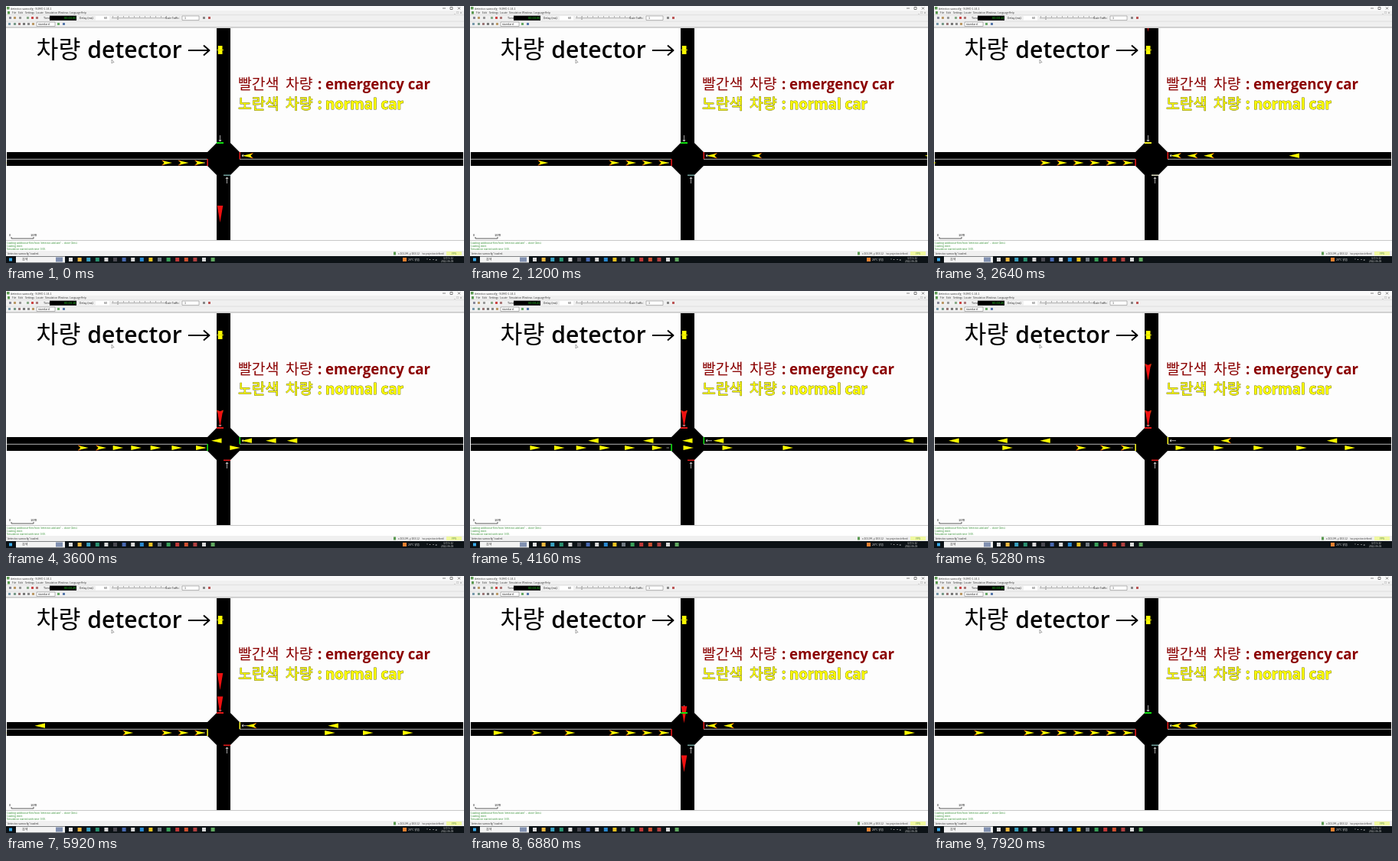
Recreate the animation shown at these times as an HTML page with a canvas. Size 598 by 336 pixels, loop 8 s.

```html
<!DOCTYPE html>
<html lang="ko">
<head>
<meta charset="utf-8">
<title>Traffic simulation</title>
<style>
html, body { margin: 0; width: 100%; height: 100%; overflow: hidden; background: #fff; }
canvas { display: block; width: 598px; height: 336px; }
</style>
</head>
<body>
<canvas id="stage" width="598" height="336"></canvas>
<script>
const ctx = document.getElementById('stage').getContext('2d');
const STEP = 80, STEPS = 100;
const LATIN = '"Open Sans", sans-serif';
const HANGUL = '"Noto Sans CJK KR", "Noto Sans CJK", sans-serif';

// Signal changes in simulation time, which slows down when traffic gets dense
const SIDE_YELLOW = 31, MAIN_GREEN = 38, MAIN_YELLOW = 62.5, SIDE_GREEN = 69.8;
const simulationTime = step => step < 58 ? step : 58 + .7 * (step - 58);

const CRUISE = 16.5, BRAKE = 2.26, BRAKE_TIME = CRUISE / BRAKE, TOP_SPEED = 18;

// Each car: queue slot, time it has stopped, start lag, then slot and time of a second stop
const eastFirst = [[1, -9], [2, -9], [3, -9], [4, 15.4], [5, 23], [6, 30],
  [7, 44.4, 0, 1, 65], [8, 46.3, 0, 2, 66.2], [9, 54, 0, 3, 67.6], [10, 63, 5.5, 4, 74.3]];
const eastSecond = [[5, 83.3], [6, 84.8], [7, 86.5], [8, 92.9]];
const westFirst = [[1, -9, .4], [2, 20.7], [3, 33.3], [4, 42.1]];
const westSecond = [[1, 71.2], [2, 78.3]];
const southCars = [[1, 45.4, -1.5], [2, 68.9, -1.5]];

function rect(x, y, w, h, color) {
  ctx.fillStyle = color;
  ctx.fillRect(x, y, w, h);
}

function line(color, width, ...points) {
  ctx.strokeStyle = color;
  ctx.lineWidth = width;
  ctx.beginPath();
  points.forEach(([x, y]) => ctx.lineTo(x, y));
  ctx.stroke();
}

function shape(color, ...points) {
  ctx.fillStyle = color;
  ctx.beginPath();
  points.forEach(([x, y]) => ctx.lineTo(x, y));
  ctx.fill();
}

function text(value, x, y, size, color = '#222', weight = 400, family = LATIN, outline) {
  ctx.font = `${weight} ${size}px ${family}`;
  if (outline) {
    ctx.strokeStyle = outline;
    ctx.lineWidth = .9;
    ctx.lineJoin = 'round';
    ctx.strokeText(value, x, y);
  }
  ctx.fillStyle = color;
  ctx.fillText(value, x, y);
}

const tiny = (value, x, y, color, size = 3.6) => text(value, x, y, size, color, 400, HANGUL);

// Distance still to go before the stop: cruising, then constant braking
function gap(left) {
  if (left <= 0) return 0;
  return left < BRAKE_TIME ? BRAKE * left * left / 2 : CRUISE * (left - BRAKE_TIME / 2);
}

// Distance covered after the light turns green; the queue starts one by one
function launch(time, green, slot, lag) {
  const since = Math.max(0, time - green + 1.7 - 1.25 * slot - lag);
  const power = .75 + .9 / slot, ramp = TOP_SPEED / power;
  return since < ramp ? power * since * since / 2 : TOP_SPEED * (since - ramp / 2);
}

// Draws a car pointing along +x with its tip at the origin
function car({ length, half, notch, color }, braking) {
  shape(color, [0, 0], [-length, -half], [(braking ? notch : 0) - length, 0], [-length, half]);
  if (braking) {
    for (const side of [-1, 1])
      line('#e04a10', .9, [-length, side * half], [-length + 3.5, side * (half - .7)]);
  }
}

const normalCar = { length: 13.5, half: 3.1, notch: 3.2, color: '#ff0' };
const emergencyCar = { length: 22, half: 3.8, notch: 1.5, color: '#f01010' };

function queue(cars, time, green, place, look = normalCar, first = 260, spacing = 21.5) {
  const slotAt = slot => first - spacing * (slot - 1);
  for (const [slot, stop, lag = 0, nextSlot, nextStop] of cars) {
    const moved = launch(time, green, slot, lag);
    const stopsAgain = nextSlot && nextStop - time < BRAKE_TIME;
    const at = stopsAgain ? slotAt(nextSlot) - gap(nextStop - time) : slotAt(slot) - gap(stop - time) + moved;
    if (at > 585) continue;
    ctx.save();
    place(at);
    car(look, stopsAgain || moved === 0 && stop - time < 8.2);
    ctx.restore();
  }
}

const eastbound = at => ctx.translate(at, 205);
const westbound = at => { ctx.translate(569 - at, 195.7); ctx.scale(-1, 1); };
const southbound = at => { ctx.translate(279.5, at); ctx.rotate(Math.PI / 2); };

function laneArrow(x, y, dx, dy) {
  const tip = [x + dx * 8, y + dy * 8];
  line('#ccc', .8, [x, y], tip);
  line('#fff', .8, [tip[0] - dx * 2 + dy * 1.5, tip[1] - dy * 2 + dx * 1.5], tip,
    [tip[0] - dx * 2 - dy * 1.5, tip[1] - dy * 2 - dx * 1.5]);
}

function roads() {
  rect(275, 29, 18, 277, '#000');
  rect(1, 191, 596, 18, '#000');
  shape('#000', [275, 179], [293, 179], [305, 191], [305, 209], [293, 221], [275, 221], [263, 209], [263, 191]);
  rect(1, 199.8, 262, .9, '#ccc');
  rect(305, 199.8, 292, .9, '#ccc');
  rect(277, 52, 5.5, 11, '#ff0');
  rect(275.5, 57, 8.5, 1, '#dd0');
  laneArrow(279.5, 169, 0, 1);
  laneArrow(288.5, 232, 0, -1);
  line('#aaa', .8, [256.5, 205], [260, 205]);
  laneArrow(316, 195.7, -1, 0);
}

function signals(time) {
  const red = '#e01818', yellow = '#f2f020', green = '#10e010';
  const mainOpen = time >= MAIN_GREEN && time < SIDE_GREEN;
  const main = !mainOpen ? red : time < MAIN_YELLOW ? green : yellow;
  const sideYellow = time >= SIDE_YELLOW && time < MAIN_GREEN;
  rect(275, 178, 9, 2, mainOpen ? red : sideYellow ? yellow : green);
  rect(284, 220.5, 9, 1.5, mainOpen ? red : sideYellow ? '#dcdcc0' : '#70a09c');
  rect(262.3, 200, 1.6, 9, main);
  rect(304.5, 191, 1.6, 9, main);
}

function captions() {
  text('차량', 39.5, 68.3, 31.4, '#000', 400, HANGUL);
  text('detector', 106.3, 68, 30.1, '#000', 600);
  line('#000', 2, [238, 58], [265, 58]);
  line('#000', 2, [258, 51.5], [265.5, 58], [258, 64.5]);
  const rows = [
    ['빨간색', 'emergency car', 109, '#8b0000'],
    ['노란색', 'normal car', 135, '#ff0', '#6c6c10']
  ];
  for (const [hue, name, y, color, outline] of rows) {
    text(hue, 303, y, 19.4, color, 400, HANGUL, outline);
    text('차량', 365, y, 19.4, color, 400, HANGUL, outline);
    text(':', 407, y, 18.7, color, 700, LATIN, outline);
    text(name, 417, y, 18.7, color, 700, LATIN, outline);
  }
}

function icons(list, y, size) {
  for (const [x, color] of list) rect(x, y, size, size, color);
}

function toolbars(time) {
  rect(0, 0, 598, 28, '#f0f0f0');
  rect(0, 0, 598, 6, '#fafafa');
  rect(1, 1, 3.5, 3.5, '#5a9a50');
  tiny('detector.sumocfg - SUMO 1.14.1', 6, 4.6, '#333');
  line('#333', .6, [570, 3], [574, 3]);
  ctx.strokeRect(580, 1.5, 3, 3);
  line('#333', .6, [590, 1.5], [593, 4.5]);
  line('#333', .6, [593, 1.5], [590, 4.5]);
  rect(2, 7, 3, 3.5, '#5a9a50');
  ['File', 'Edit', 'Settings', 'Locate', 'Simulation', 'Windows', 'Language', 'Help']
    .forEach((name, i) => tiny(name, [8, 16, 25, 39, 51, 68, 83, 98][i], 10.3, '#333', 3.2));
  tiny('_ □ ×', 585, 10, '#555');
  rect(0, 11.6, 598, .5, '#ccc');
  rect(0, 19.8, 598, .5, '#ccc');
  rect(0, 27.6, 598, .8, '#999');

  icons([[4, '#889'], [10, '#b96'], [17, '#999'], [27, '#8a8'], [33, '#c44'], [39, '#a77'],
    [257, '#888'], [264, '#b55']], 14, 3);
  tiny('Time:', 49, 17.2);
  rect(57, 12.7, 35, 6.2, '#000');
  const seconds = Math.floor(180 + time * .42);
  tiny('00:0' + Math.floor(seconds / 60) + ':' + String(seconds % 60).padStart(2, '0'), 76, 17.4, '#20d820', 4);
  tiny('Delay (ms):', 96, 17.2);
  rect(117, 13, 18, 5.5, '#fff');
  tiny('60', 128, 17.2);
  rect(138, 15.4, 71, .8, '#999');
  for (let x = 139; x < 210; x += 7) rect(x, 13, .6, 2, '#888');
  rect(145, 13.5, 2, 4.5, '#bbb');
  tiny('Scale Traffic:', 208, 17.2, '#222', 3.2);
  rect(230, 13, 22, 5.5, '#fff');
  ctx.strokeStyle = '#888';
  ctx.lineWidth = .6;
  ctx.strokeRect(230, 13, 22, 5.5);
  tiny('1', 233, 17.2);

  icons([[3, '#79a'], [10, '#798'], [16, '#977'], [22, '#777'], [28, '#888'], [34, '#b96'],
    [67, '#6a6'], [74, '#57a']], 22, 3);
  rect(40, 21, 24, 5.5, '#fff');
  ctx.strokeRect(40, 21, 24, 5.5);
  tiny('standard', 42, 25.2);
}

function footer() {
  line('#333', .8, [7, 302], [7, 304], [36, 304], [36, 302]);
  tiny('0', 4, 300.5, '#111', 4);
  tiny('10m', 32, 300.5, '#111', 4);
  rect(0, 306, 598, 1.2, '#c8c8c8');
  rect(0, 307, 598, 13, '#fff');
  tiny("Loading additional-files from 'detector.add.xml' ... done (1ms).", 1, 311, '#2a8a2a', 3.2);
  tiny('Loading done.', 1, 314.8, '#2a8a2a', 3.2);
  tiny('Simulation started with time: 0.00.', 1, 318.6, '#2a8a2a', 3.2);
  rect(0, 320, 598, 7, '#f0f0f0');
  tiny("'detector.sumocfg' loaded.", 1, 324.8, '#333', 3.4);
  rect(506, 321.5, 3, 4, '#5a9a50');
  tiny('x:101.84, y:103.12', 512, 324.8, '#333', 3.4);
  tiny('(No projection defined)', 543, 324.8, '#333', 2.7);
  rect(575, 321, 20, 5, '#f0f8a0');
  tiny('FPS', 582, 324.8, '#584', 3.4);

  rect(0, 327, 598, 9, '#0c1216');
  rect(4, 329.5, 4, 4, '#39a9e8');
  rect(13, 327.5, 64, 8, '#f3f3f3');
  tiny('검색', 21, 333, '#444', 4);
  rect(65, 328.5, 9, 6, '#8090b0');
  ['#ddd', '#f0b840', '#38a0c0', '#2a9070', '#d8d8d8', '#484850', '#4868b0', '#d8d8d8', '#2888d0', '#e8c020',
    '#707880', '#38a058', '#c03838', '#d05030', '#b04040', '#d8d8d8', '#60a860']
    .forEach((color, i) => rect(82 + i * 11.6, 329, 5, 5, color));
  rect(518, 329, 5, 5, '#e88030');
  tiny('20°C 맑음', 525, 333, '#ddd');
  tiny('^ ▪ ▪ ◂', 549, 333, '#ddd');
  tiny('오후 5:32', 571, 331.2, '#ddd', 3.2);
  tiny('2022-06-05', 568, 335, '#ddd', 3.2);
}

function pointer() {
  const outline = [[138, 70], [138, 75], [139.4, 73.8], [141, 73.6], [138, 70]];
  shape('#fff', ...outline);
  line('#555', .5, ...outline);
}

function draw(step) {
  const time = simulationTime(step);
  rect(0, 0, 598, 336, '#fdfdfd');
  roads();
  ctx.save();
  ctx.beginPath();
  ctx.rect(0, 29, 597, 277);
  ctx.clip();
  queue(eastFirst, time, MAIN_GREEN, eastbound);
  queue(eastSecond, time, Infinity, eastbound);
  queue(westFirst, time, MAIN_GREEN, westbound);
  queue(westSecond, time, Infinity, westbound);
  queue(southCars, time, SIDE_GREEN, southbound, emergencyCar, 178, 29);
  southbound(283 + CRUISE * time);
  car(emergencyCar, false);
  ctx.restore();
  signals(time);
  captions();
  toolbars(time);
  footer();
  pointer();
}

function tick() {
  draw(Math.floor(performance.now() / STEP) % STEPS);
  requestAnimationFrame(tick);
}
tick();
</script>
</body>
</html>
```
